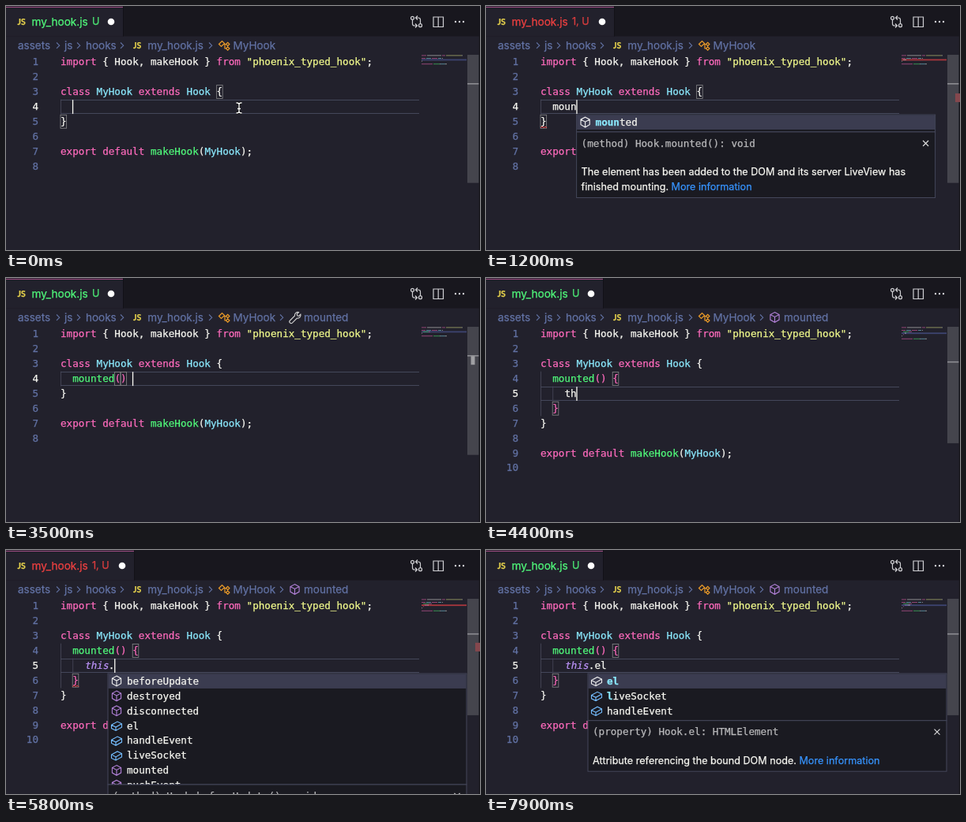
An HTML page for the animation above (8000 ms loop, 600 by 310 pixels).

```html
<!DOCTYPE html>
<html lang="en">
<head>
<meta charset="utf-8">
<title>Typing a hook</title>
<style>
html, body { margin: 0; width: 100%; height: 100%; overflow: hidden; background: #22212c; }
svg { display: block; width: 600px; height: 310px; }
text, tspan { white-space: pre; fill: currentColor; stroke: currentColor; stroke-width: .25px; }
.mono { font: 12.62px "DejaVu Sans Mono", monospace; }
.ui { font: 13.5px Inter, sans-serif; }
.tab { font: 13.65px Inter, sans-serif; }
.flag { font: 12.6px Inter, sans-serif; }
.doc { font: 12.62px Inter, sans-serif; }
.abc { font: 10px Inter, sans-serif; }
.js { font: bold 10.5px Lato, sans-serif; }
</style>
</head>
<body>
<svg id="stage" viewBox="0 0 600 310"></svg>
<script>
const LOOP = 8000, STEP = 100;
const LEFT = 69, TOP = 62, CHAR = 7.6, ROW = 18.9, BASE = 13.37;
const INK = { w: '#f8f8f2', p: '#ff6bbd', c: '#8be9fd', g: '#50fa7b', y: '#f1fa8c', v: '#bd93f9' };
const MUTED = '#6272a4', RED = '#f04040', EDGE = '#44475a', PANEL = '#1a1a21', WIDE = 454;

// time, method line, body line (once it exists), caret offset from the end
const KEYS = [
  [0, ''], [300, 'm'], [1000, 'mo'], [1100, 'mou'], [1200, 'moun'], [1300, 'mount'],
  [1400, 'mounte'], [1600, 'mounted'], [3000, 'mounted()', null, 1], [3200, 'mounted()'],
  [3400, 'mounted() '], [3800, 'mounted() {}', null, 1], [4000, 'mounted() {', ''],
  [4300, 'mounted() {', 't'], [4400, 'mounted() {', 'th'], [4500, 'mounted() {', 'thi'],
  [4600, 'mounted() {', 'this'], [4800, 'mounted() {', 'this.'],
  [5900, 'mounted() {', 'this.e'], [6100, 'mounted() {', 'this.el']
];

const colX = c => LEFT + c * CHAR;
const rowY = r => TOP + (r - 1) * ROW;
const miniY = r => 62.1 + (r - 1) * 1.8;
const rect = (x, y, w, h, fill, more = '') =>
  `<rect x="${x}" y="${y}" width="${w}" height="${h}" fill="${fill}" ${more}/>`;
const line = (d, color, width = 1) =>
  `<path d="${d}" stroke="${color}" stroke-width="${width}" fill="none"/>`;
const text = (cls, x, y, s, color, more = '') =>
  `<text class="${cls}" x="${x}" y="${y}" color="${color}" ${more}>${s}</text>`;
const slanted = (cls, x, y, s, color) =>
  text(cls, 0, 0, s, color, `transform="translate(${x} ${y}) skewX(-11)"`);

const ICONS = {
  cube: (x, y, c) => line(`M${x} ${y - 6.5}l5.6 3v6.6l-5.6 3.2l-5.6 -3.2v-6.6zM${x - 5.6} ${y - 3.5}l5.6 3l5.6 -3M${x} ${y - .5}v6.8`, c, 1.1),
  brick: (x, y, c) => line(`M${x - 6.5} ${y - 1}l7.5 -4.2l5.5 2.7v4.4l-7.5 4.2l-5.5 -2.8zM${x - 6.5} ${y - 1}l5.5 2.8l7.5 -4.3M${x - 1} ${y + 1.8}v4.3`, c, 1.1),
  abc: (x, y, c) => text('abc', x - 8, y + 3.5, 'abc', c),
  wrench: (x, y, c) => line(`M${x - 6} ${y + 4}l6 -6a4 4 0 0 1 5 -4.5l-2.3 2.4l.5 2l2 .5l2.2 -2.3a4 4 0 0 1 -4.6 5l-6 6a1.9 1.9 0 0 1 -2.8 -3.1z`, c, 1.1),
  tree: (x, y, c) => line(`M${x - 6.5} ${y - 1.5}l4 -4l3 3l-4 4zM${x - 1} ${y - 1.5}h4M${x + 1} ${y - 1.5}v5.5h2M${x + 2.5} ${y - 1.5}l2.2 -2.2l2.2 2.2l-2.2 2.2zM${x + 2.5} ${y + 4}l2.2 -2.2l2.2 2.2l-2.2 2.2z`, c, 1.2)
};

// each token is a colour key followed by its text
function codeLines(method, body) {
  const split = method.indexOf('(');
  const head = split < 0 ? ['w  ' + method]
    : ['g  ' + method.slice(0, split), 'p' + method.slice(split)];
  const inner = body == null ? [] : [
    body.startsWith('this') ? ['v    this', 'w' + body.slice(4)] : ['w    ' + body],
    ['p  }']
  ];
  return [
    ['pimport', 'w { Hook, makeHook } ', 'pfrom', 'y "phoenix_typed_hook"', 'w;'],
    [],
    ['pclass', 'c MyHook', 'p extends', 'c Hook', 'w {'],
    head, ...inner,
    ['w}'],
    [],
    ['pexport default', 'g makeHook', 'w(', 'cMyHook', 'w);'],
    []
  ];
}

function tabBar(error) {
  const end = error ? 162 : 148, tint = error ? RED : INK.g, icon = '#d0d0d4';
  return rect(0, 0, 600, 38.5, '#18171e') + rect(0, 0, end, 38.5, '#22212c') +
    rect(0, 1, end, 1, '#a04c82') + rect(end, 0, 1, 38.5, '#121117') +
    text('js', 14.5, 24, 'JS', '#e8d44d') +
    text('tab', 32.4, 24.5, 'my_hook.js', tint) +
    text('flag', 109, 24.4, error ? '1, U' : 'U', tint, 'opacity=".9"') +
    `<circle cx="${end - 15}" cy="20" r="4.3" fill="#fff"/>` +
    line('M541 14h12.5v12.5h-12.5zM547.2 14v12.5', icon, 1.2) +
    line('M514.5 17.5v5q0 2.5 2.5 2.5h3M518 22.5l2.5 2.5l-2.5 2.5M524.5 22.5v-5q0 -2.5 -2.5 -2.5h-3M521 12.5l-2.5 2.5l2.5 2.5', icon, 1.2) +
    [[514.5, 15.3], [524.5, 24.7]].map(([x, y]) =>
      `<circle cx="${x}" cy="${y}" r="2" fill="#18171e" stroke="${icon}" stroke-width="1.2"/>`).join('') +
    [569, 574, 579].map(x => `<circle cx="${x}" cy="20" r="1.2" fill="${icon}"/>`).join('');
}

function breadcrumbs(t) {
  const crumbs = [[15, 'assets'], [74, 'js'], [101, 'hooks'], [179.3, 'my_hook.js'], [287.5, 'MyHook']];
  const arrows = [66, 92, 147, 259];
  let out = text('js', 161, 54, 'JS', '#e8d44d') + ICONS.tree(276, 50, '#ee9d28');
  if (t >= 1800) {
    crumbs.push([377, 'mounted']);
    arrows.push(349);
    out += t < 4000 ? ICONS.wrench(365.5, 50, '#d0d0d0') : ICONS.cube(365.5, 50, '#b180d7');
  }
  return out + crumbs.map(([x, s]) => text('ui', x, 54.5, s, MUTED)).join('') +
    arrows.map(x => line(`M${x - 2} 46.5l3.7 3.7l-3.7 3.7`, MUTED, 1.1)).join('');
}

function code(lines, row) {
  let out = '';
  lines.forEach((tokens, i) => {
    const y = rowY(i + 1) + BASE;
    out += text('mono', 41, y, i + 1, i + 1 === row ? INK.w : MUTED, 'text-anchor="end"');
    let col = 0;
    for (const token of tokens) {
      const key = token[0], s = token.slice(1), word = s.trim();
      const start = col + s.length - s.trimStart().length;
      const put = key === 'v' ? slanted : text;
      if (word) {
        out += put('mono', colX(start), y, word, INK[key]);
        out += rect(526 + start, miniY(i + 1) + .3, word.length, 1, INK[key], 'opacity=".5"');
      }
      col += s.length;
    }
  });
  return out;
}

function brackets(t) {
  const pair = t < 3000 ? [[3, 26], [5, 0]] : t < 3800 ? [[4, 9], [4, 10]]
    : t < 4000 ? [[4, 12], [4, 13]] : [[4, 12], [6, 2]];
  return pair.map(([r, c]) =>
    rect(colX(c), rowY(r) + .8, CHAR, ROW - 2, 'none', 'stroke="#7d7d80" stroke-width=".9"')).join('');
}

function scrollbar(t, row, count, error) {
  const scale = 248 / ((count + 12) * ROW);
  const markY = r => TOP + (r - 1) * ROW * scale;
  let out = rect(584, TOP, 14.5, 248 * scale, '#45454d') + rect(584, markY(row) - 1.2, 14.5, 1.6, '#8d8d92');
  if (t >= 3000 && t < 4000) out += rect(588.5, markY(4), 5, 11, '#a0a0a3');
  out += rect(598.8, 0, 1.2, 310, '#15141a');
  if (error) out += rect(594, markY(row + 1) - .5, 6, 11, '#85474d');
  return out;
}

function docs(x, y, signature, lines) {
  const last = lines.length - 1;
  return rect(x, y, WIDE, 45.5 + 19 * lines.length, PANEL, `stroke="${EDGE}"`) +
    text('mono', x + 6, y + 18.6, signature, '#b9b9bb') +
    line(`M${x + 438.5} ${y + 11}l7 7m0 -7l-7 7`, '#e0e0e0', 1.1) +
    lines.map((s, i) => text('doc', x + 6, y + 54.8 + i * 19, s +
      (i === last ? ' <tspan color="#3794ff">More information</tspan>' : ''), INK.w)).join('');
}

// items: icon, label, number of matched letters
function popup(x, row, items, info, height = items.length * ROW + 3) {
  const y = rowY(row + 1) + .5;
  let out = rect(x, y, WIDE, height, PANEL, `stroke="${EDGE}"`) + rect(x + .5, y + .5, WIDE - 1, ROW - .5, '#3b3c50');
  items.forEach(([icon, label, hit = 0], i) => {
    const mid = y + 9.6 + i * ROW;
    const tint = !i || icon === 'abc' ? '#f0f0f0' : icon === 'cube' ? '#b180d7' : '#75beff';
    out += ICONS[icon](x + 11, mid, tint) + text('mono', x + 24, mid + 4.2,
      `<tspan color="${INK.c}" font-weight="bold">${label.slice(0, hit)}</tspan>${label.slice(hit)}`, INK.w);
  });
  return out + (info ? docs(x, y + height, ...info) : '');
}

const MOUNTED = ['(method) Hook.mounted(): void',
  ['The element has been added to the DOM and its server LiveView has', 'finished mounting.']];
const ELEMENT = ['(property) Hook.el: HTMLElement', ['Attribute referencing the bound DOM node.']];
const UPDATE = ['(method) Hook.beforeUpdate(): void', ['The element is about to be updated in the DOM.']];
const MEMBERS = [['cube', 'beforeUpdate'], ['cube', 'destroyed'], ['cube', 'disconnected'], ['brick', 'el'],
  ['brick', 'handleEvent'], ['brick', 'liveSocket'], ['cube', 'mounted'], ['cube', 'pushEvent']];
const MATCHES = [['brick', 'el', 2], ['brick', 'liveSocket', 1], ['brick', 'handleEvent']];

function suggestions(t, method, caretX) {
  if (t >= 500 && t < 3000) {
    const n = method.length, items = [['cube', 'mounted', n]];
    if (n < 3) items.push(['abc', 'makeHook', 1], ['abc', 'MyHook', 1]);
    return popup(Math.min(caretX, 129), 4, items, t >= 800 && MOUNTED);
  }
  if (t >= 5900) return popup(129, 5, MATCHES, ELEMENT);
  return t >= 4900 ? popup(129, 5, MEMBERS, UPDATE, 141) : '';
}

function draw(t) {
  const [since, method, body, back = 0] = KEYS.findLast(k => k[0] <= t);
  const nested = body != null, row = nested ? 5 : 4;
  const lines = codeLines(method, body);
  const caretX = colX((nested ? 4 + body.length : 2 + method.length) - back);
  const error = (t >= 900 && t < 1500) || (t >= 5300 && t < 6900);
  const y = rowY(row);

  let out = rect(0, 0, 600, 310, '#22212c') + tabBar(error) + breadcrumbs(t);
  out += line(`M${LEFT} ${Math.round(y) + .5}H523M${LEFT} ${Math.floor(y + ROW) - .5}H523`, EDGE);
  out += line(`M69.5 ${rowY(4)}V${rowY(nested ? 7 : 5)}` + (nested ? `M84.7 ${y}v${ROW}` : ''), '#4a4b5c', .8);
  out += rect(526, miniY(row), 57, 1.8, error ? '#a8373d' : '#3d4470');
  out += brackets(t) + code(lines, row) + scrollbar(t, row, lines.length, error);
  if (error) out += line(`M${colX(nested ? 2 : 0)} ${rowY(row + 2) - 1.5}l2 -2l2 2l2 -2l2 2`, RED);
  if ((t - since) % 1000 < 500) out += rect(caretX - .3, y + .5, 1.3, ROW - 1, INK.w);
  out += suggestions(t, method, caretX);
  if (t < 300) {
    const beam = 'M291.5 123q3.5 0 3.5 2v9q0 2 -3.5 2M298.5 123q-3.5 0 -3.5 2v9q0 2 3.5 2M293 130.5h4';
    out += line(beam, '#111', 3) + line(beam, '#fff', 1.3);
  }
  return out;
}

const stage = document.getElementById('stage');
let shown = -1;
function tick() {
  const t = Math.floor(performance.now() % LOOP / STEP) * STEP;
  if (t !== shown) stage.innerHTML = draw(shown = t);
  requestAnimationFrame(tick);
}
tick();
</script>
</body>
</html>
```
